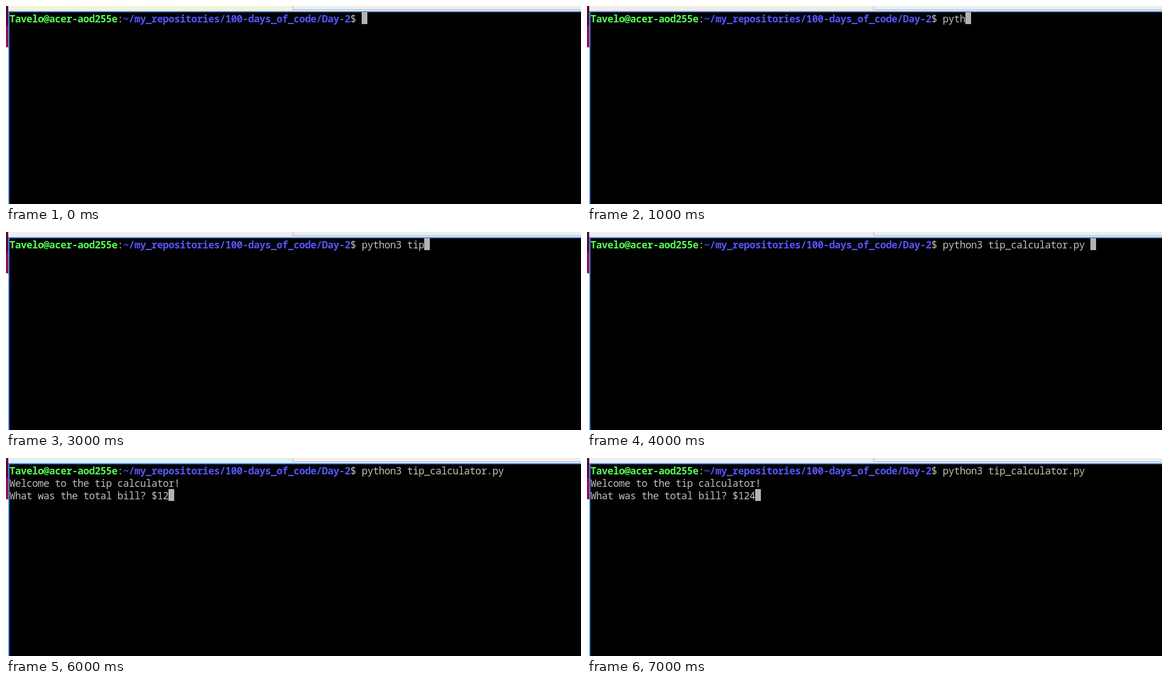
These frames come from a looping animation (1012x350 px, 8 s). An HTML page:

```html
<!DOCTYPE html>
<html lang="en">
<head>
<meta charset="utf-8">
<title>Tip calculator in a terminal</title>
<style>
  html, body { margin: 0; width: 100%; height: 100%; overflow: hidden; background: #fff; }
  svg { display: block; }
  text {
    font: 17.5px "Noto Sans Mono", "DejaVu Sans Mono", monospace;
    letter-spacing: -.5px;
    white-space: pre;
    fill: #c0c0ba;
  }
  .user, .path { font-weight: 700; }
  .user { fill: #55ff55; }
  .path { fill: #5555ff; }
</style>
</head>
<body>
<svg width="1012" height="350" viewBox="0 0 1012 350">
  <rect width="1012" height="350" fill="#fff"/>
  <rect width="4" height="35" fill="#5c0a38"/>
  <rect y="35" width="4" height="38" fill="#a0064f"/>
  <rect id="bar" x="4" width="1008" height="9"/>
  <rect id="tab" x="504" width="508" height="6"/>
  <path d="M504.5 0V6.5H1012" fill="none" stroke="#b4b4b0"/>
  <rect x="4" y="9" width="1008" height="341" fill="#4a90f0"/>
  <rect x="6" y="11" width="1006" height="339" fill="#000"/>
  <text x="6" y="29"><tspan class="user">Tavelo@acer-aod255e</tspan>:<tspan class="path">~/my_repositories/100-days_of_code/Day-2</tspan>$ </text>
  <text id="command" x="626" y="29"></text>
  <text id="welcome" x="6" y="51"></text>
  <text id="question" x="6" y="73"></text>
  <rect id="cursor" width="10" height="21" fill="#b5b2ae"/>
</svg>
<script>
  const STEP = 1000, CELL = 10, LEFT = 6, PROMPT = 62;
  const FULL = 'python3 tip_calculator.py ';
  const WELCOME = 'Welcome to the tip calculator!';
  const QUESTION = 'What was the total bill? $';

  // command typed so far, answer typed so far (null before the run), bar and tab tints
  const states = [
    ['', null, '#f5f2d6', '#eaeeee'],
    ['pyth', null, '#f4ebe0', '#e9eef1'],
    ['python3', null, '#f7e8f0', '#e5f0f6'],
    ['python3 tip', null, '#f7eaee', '#e7eff4'],
    [FULL, null, '#f6eaee', '#e8eff4'],
    [FULL, '', '#f3ebf0', '#ececf2'],
    [FULL, '12', '#dff0f5', '#f6eaee'],
    [FULL, '124', '#eeeef0', '#ececf2']
  ];

  const el = id => document.getElementById(id);
  const set = (id, attrs) => {
    for (const key in attrs) el(id).setAttribute(key, attrs[key]);
  };
  let shown = -1;

  function show(index) {
    const [typed, answer, bar, tab] = states[index];
    const running = answer !== null;
    const line = running ? QUESTION + answer : '';
    el('command').textContent = typed;
    el('welcome').textContent = running ? WELCOME : '';
    el('question').textContent = line;
    set('bar', { fill: bar });
    set('tab', { fill: tab });
    set('cursor', {
      x: LEFT + CELL * (running ? line.length : PROMPT + typed.length),
      y: running ? 55 : 11
    });
  }

  function tick() {
    const index = Math.floor(performance.now() / STEP) % states.length;
    if (index !== shown) show(shown = index);
    requestAnimationFrame(tick);
  }
  tick();
</script>
</body>
</html>
```
